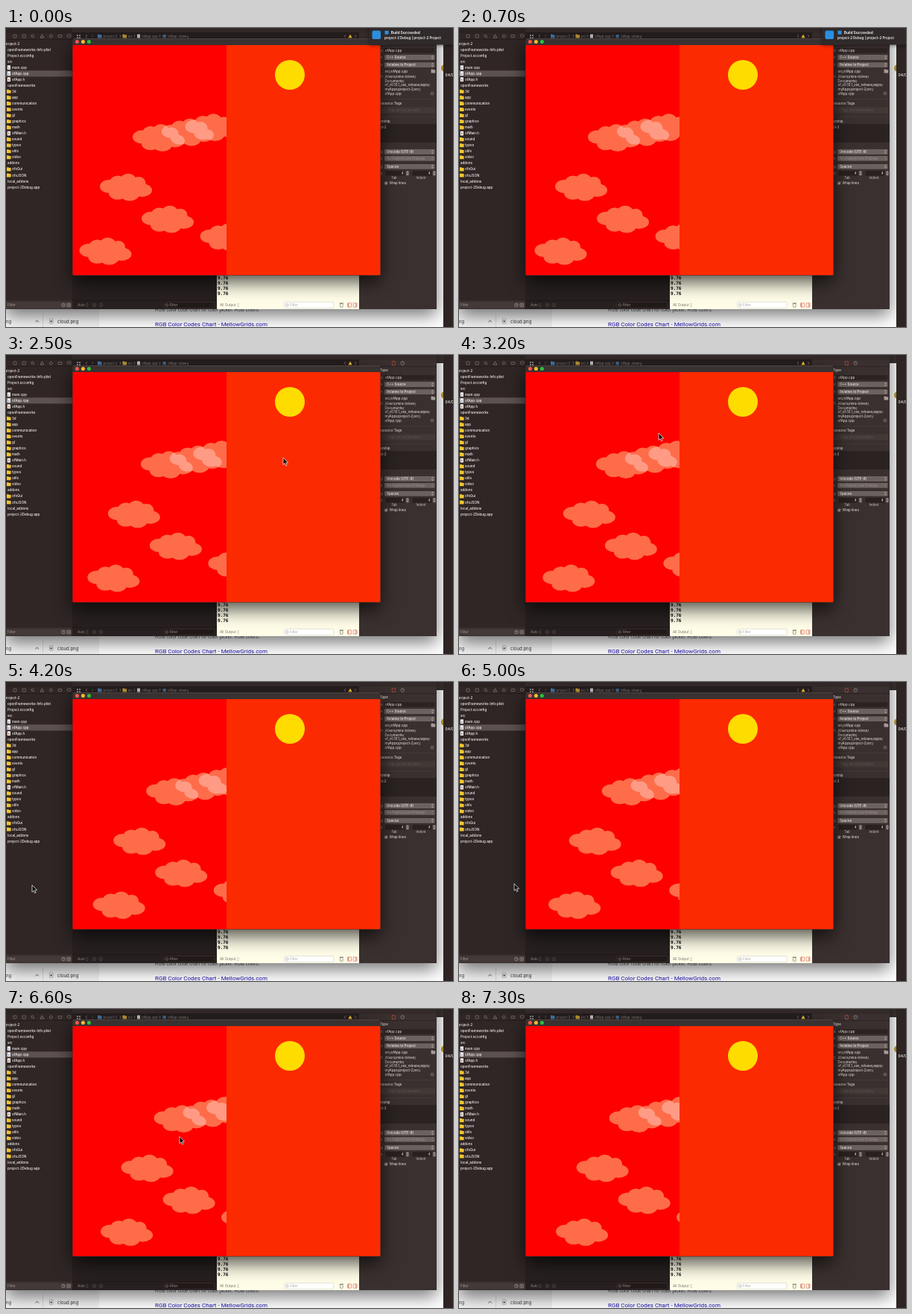
An HTML page with a canvas for the animation above (7400 ms loop, 600x402 px).

```html
<!DOCTYPE html>
<html lang="en">
<head>
<meta charset="utf-8">
<title>Drifting clouds</title>
<style>
html, body { margin: 0; width: 100%; height: 100%; overflow: hidden; background: #2d2423; }
canvas { display: block; width: 600px; height: 402px; }
</style>
</head>
<body>
<canvas id="stage"></canvas>
<script>
const W = 600, H = 402, LOOP = 7400, STEP = 100;
const UI = 'Inter, "Liberation Sans", sans-serif';
const ARIAL = '"Liberation Sans", sans-serif';
const ROBOTO = 'Roboto, sans-serif';
const MONO = '"DejaVu Sans Mono", monospace';
const stage = document.getElementById('stage');
const dpr = window.devicePixelRatio || 1;
stage.width = W * dpr;
stage.height = H * dpr;
let c = stage.getContext('2d');

function rect(x, y, w, h, fill) {
  c.fillStyle = fill;
  c.fillRect(x, y, w, h);
}

function round(x, y, w, h, r, fill, line) {
  c.beginPath();
  c.roundRect(x, y, w, h, r);
  if (fill) { c.fillStyle = fill; c.fill(); }
  if (line) { c.strokeStyle = line; c.lineWidth = 0.6; c.stroke(); }
}

function dot(x, y, r, fill, line) {
  c.beginPath();
  c.arc(x, y, r, 0, Math.PI * 2);
  if (fill) { c.fillStyle = fill; c.fill(); }
  if (line) { c.strokeStyle = line; c.lineWidth = 0.6; c.stroke(); }
}

function lines(points, color, width = 0.7) {
  c.beginPath();
  points.forEach(([x, y], i) => i ? c.lineTo(x, y) : c.moveTo(x, y));
  c.strokeStyle = color;
  c.lineWidth = width;
  c.stroke();
}

// y is the vertical middle of the text
function text(s, x, y, size, color, { font = UI, weight = 400, align = 'left' } = {}) {
  c.font = `${weight} ${size}px ${font}`;
  c.textAlign = align;
  c.textBaseline = 'alphabetic';
  c.fillStyle = color;
  c.fillText(s, x, y + size * 0.36);
}

function chevron(x, y, dir, color) {
  lines([[x - dir, y - 2], [x + dir, y], [x - dir, y + 2]], color);
}

function updown(x, y, color) {
  lines([[x - 1, y - 0.8], [x, y - 2], [x + 1, y - 0.8]], color, 0.6);
  lines([[x - 1, y + 0.8], [x, y + 2], [x + 1, y + 0.8]], color, 0.6);
}

function shadow(blur, dy, alpha, draw) {
  c.save();
  c.shadowColor = `rgba(0,0,0,${alpha})`;
  c.shadowBlur = blur * dpr;
  c.shadowOffsetY = dy * dpr;
  draw();
  c.restore();
}

function browser() {
  rect(0, 0, W, H, '#2d2423');
  rect(0, 376, 125, 26, '#f3f2f3');
  rect(125, 0, 462, H, '#ffffff');
  rect(578, 0, 9, 11, '#3a3231');
  dot(589, 54, 5, '#c39a25');
  text('RGB color code chart for color picker. RGB colors.', 200, 378.5, 6.3, '#56585c', { font: ARIAL });
  text('RGB Color Codes Chart - MellowGrids.com', 200, 398.5, 8, '#1a0dab', { font: ROBOTO });
  text('ng', 0, 394.5, 6, '#3c3c3f');
  lines([[39.5, 395.5], [41.7, 393], [43.9, 395.5]], '#55555a', 0.9);
  rect(49, 384, 0.7, 18, '#cccccc');
  round(58.5, 391, 4.4, 6.4, 0.5, '#ffffff', '#88888c');
  rect(59.5, 393.2, 2.4, 2.4, '#5f6a7d');
  text('cloud.png', 69, 394.7, 6, '#303034');
}

const TREE = [
  ['project-2', 0], ['openFrameworks-Info.plist', 0], ['Project.xcconfig', 0], ['src', 0],
  ['main.cpp', 1], ['ofApp.cpp', 1], ['ofApp.h', 1], ['openFrameworks', 0],
  ['3d', 1], ['app', 1], ['communication', 1], ['events', 1], ['gl', 1], ['graphics', 1],
  ['math', 1], ['ofMain.h', 1], ['sound', 1], ['types', 1], ['utils', 1], ['video', 1],
  ['addons', 0], ['ofxGui', 1], ['ofxJSON', 1], ['local_addons', 0], ['project-2Debug.app', 0]
];

function folder(x, y, fill) {
  round(x, y - 2.5, 2.8, 2, 0.5, fill);
  round(x, y - 1.8, 5.6, 4.4, 0.5, fill);
}

function sidebar() {
  rect(0, 0, 89, 378, '#2f2625');
  rect(0, 0, 89, 7, '#2b2322');
  const icon = '#8e8583';
  round(10, 9, 4, 4, 0.4, null, icon);
  round(22, 9, 4.4, 4, 0.4, null, icon);
  dot(35.5, 10.6, 1.7, null, icon);
  lines([[36.7, 11.8], [38, 13.2]], icon);
  lines([[46, 13], [48.4, 8.8], [50.8, 13], [46, 13]], icon);
  lines([[58, 11], [60.3, 8.7], [62.6, 11], [60.3, 13.3], [58, 11]], icon);
  round(70, 9.5, 4.8, 3, 0.3, null, icon);
  round(82.5, 8.8, 4.4, 3.3, 0.8, null, icon);
  rect(0, 15.2, 89, 0.6, '#1e1817');
  rect(0, 57.2, 89, 8.2, '#5c5250');
  TREE.forEach(([name, level], i) => {
    const y = 20.9 + i * 8.045;
    text(name, level ? 8 : i ? 2 : -1.5, y, 4.5, '#f7f3f2', { weight: 500 });
    if (!level) return;
    if (name.includes('.')) {
      round(1.7, y - 2.9, 4.3, 5.8, 0.4, '#f1eeee');
      text(name.endsWith('.h') ? 'h' : 'c', 2.8, y + 0.4, 3.5, name.endsWith('.h') ? '#a2532d' : '#4668ad', { weight: 700 });
    } else folder(1, y, '#f4c531');
  });
  rect(0, 366.5, 89, 11.5, '#3a302f');
  round(-4, 368.2, 92, 8.5, 2, '#433a38');
  text('Filter', 2, 372.6, 4.6, '#a49a98');
  dot(77, 372.5, 2.3, null, '#b5acaa');
  lines([[77, 371], [77, 372.6], [78.2, 372.6]], '#b5acaa', 0.5);
  round(82, 370.3, 4.4, 4.4, 0.4, null, '#b5acaa');
  lines([[84.2, 371.3], [84.2, 373.7]], '#b5acaa', 0.5);
  lines([[83, 372.5], [85.4, 372.5]], '#b5acaa', 0.5);
}

function editor() {
  rect(89, 0, 385, 378, '#282020');
  rect(89, 0, 385, 6.5, '#332a29');
  rect(89, 6.5, 385, 0.6, '#1b1514');
  const dim = '#8b8280';
  [[95, 9], [98, 9], [95, 12], [98, 12]].forEach(([x, y]) => rect(x, y, 2, 2, dim));
  chevron(108, 11, -1, dim);
  chevron(116, 11, 1, '#5c5351');
  folder(123, 11, '#4779a8');
  text('project-2', 130.5, 11, 4.4, dim);
  chevron(153.5, 11, 0.7, dim);
  folder(156.5, 11, '#c39a32');
  text('src', 163.5, 11, 4.4, dim);
  chevron(172.5, 11, 0.7, dim);
  round(176, 8.4, 4, 5.2, 0.4, '#c9c3c1');
  text('ofApp.cpp', 182, 11, 4.4, dim);
  chevron(206.5, 11, 0.7, dim);
  rect(210.5, 9, 4.3, 4.3, '#40688e');
  text('ofApp::draw()', 217, 11, 4.4, dim);
  chevron(455, 11, -1, dim);
  c.fillStyle = '#f4c72d';
  c.beginPath();
  c.moveTo(459.4, 13.3); c.lineTo(462, 8.4); c.lineTo(464.6, 13.3);
  c.fill();
  chevron(469, 11, 1, dim);
}

function debugArea() {
  rect(89, 332, 194, 46, '#282020');
  rect(283, 332, 191, 46, '#fffde8');
  rect(89, 366, 194, 0.6, '#1b1514');
  for (let i = 0; i < 4; i++) {
    text('9.76', 284, 336.3 + i * 6.8, 6, '#111111', { font: MONO, weight: 700 });
  }
  text('Auto', 96, 372.5, 4.6, '#8d8381');
  updown(109, 372.5, '#8d8381');
  dot(118.5, 372.5, 2.3, null, '#5d5351');
  dot(118.5, 372.5, 0.8, '#5d5351');
  dot(127.3, 372.5, 2.3, null, '#5d5351');
  rect(127, 371.5, 0.6, 2.4, '#5d5351');
  round(212, 368.3, 68, 8.4, 1.8, '#221a19', '#433937');
  dot(215.8, 372.5, 1.7, null, '#9d9391');
  text('Filter', 219.5, 372.6, 4.6, '#9d9391');
  text('All Output', 287, 372.5, 4.6, '#76736a');
  updown(311.5, 372.5, '#76736a');
  round(373.5, 368.3, 66.5, 8.4, 1.8, '#ffffff', '#d2cfc0');
  dot(377.3, 372.5, 1.7, null, '#8c8c8c');
  text('Filter', 381, 372.6, 4.6, '#aaa9a4');
  round(448.5, 370.5, 3.6, 4.8, 0.5, null, '#66635d');
  lines([[447.6, 370], [453, 370]], '#66635d', 0.8);
  round(458.5, 369.8, 5, 5.4, 0.4, null, '#d15a4c');
  round(466, 369.8, 5, 5.4, 0.4, null, '#d15a4c');
  rect(459, 370, 1.6, 5, '#e79a8d');
  rect(469, 370, 1.6, 5, '#e79a8d');
}

function popup(label, y, color = '#f6f1ef') {
  round(508, y - 3.4, 67.5, 6.8, 1.2, '#6b615f');
  text(label, 511, y, 4.5, color, { weight: 500 });
  updown(572.5, y, color);
}

function stepper(x, y) {
  rect(x - 24, y - 3.2, 26, 6.4, '#292120');
  text('4', x, y, 4.4, '#f0eae8', { align: 'right' });
  round(x + 3.4, y - 3.3, 4, 6.6, 1.2, '#6b615f');
  updown(x + 5.4, y, '#f0eae8');
}

function inspector() {
  rect(474, 0, 104, 378, '#3a302f');
  rect(474, 0, 104, 6.5, '#332a29');
  rect(474, 15.2, 104, 0.6, '#241d1c');
  const pale = '#f3eeec', dim = '#9d9391', bold = { weight: 600 };
  round(518.3, 8.4, 4, 5.2, 0.4, null, '#df5140');
  dot(532.3, 11, 2.4, null, dim);
  text('?', 531.3, 11.1, 3.5, dim);
  text('Type', 502, 20.5, 4.5, '#d8d0ce', bold);
  text('e', 503, 30.5, 4.4, dim);
  rect(507.5, 27.2, 68, 6.4, '#2b2322');
  text('ofApp.cpp', 509, 30.5, 4.5, pale);
  text('e', 503, 39.5, 4.4, dim);
  popup('C++ Source', 39.5);
  text('n', 503, 49.6, 4.4, dim);
  popup('Relative to Project', 49.6);
  text('src/ofApp.cpp', 508.5, 58, 4.5, pale);
  folder(570.6, 58, '#a69c9a');
  text('h', 503, 65.3, 4.4, dim);
  ['/Users/mira-tolven/', 'Documents/', 'of_v0.10.1_osx_release/apps/', 'myApps/project-2/src/', 'ofApp.cpp']
    .forEach((s, i) => text(s, 508.5, 65.3 + i * 5.7, 4.5, pale));
  dot(572, 88, 1.9, null, dim);
  lines([[571.2, 88], [572.8, 88]], dim, 0.6);
  rect(502, 95, 74, 0.6, '#4a403e');
  text('esource Tags', 502, 101, 4.5, '#c9c1bf', bold);
  rect(502, 106.5, 74, 8, '#423836');
  text('Tags are not available', 513, 110.5, 4.2, '#5d5351');
  rect(502, 119.5, 74, 0.6, '#4a403e');
  text('ership', 502, 125.2, 4.5, '#c9c1bf', bold);
  rect(502, 129, 76, 25, '#2b2322');
  text('ct-2', 502, 133, 4.4, pale);
  text('g', 503, 166.5, 4.4, dim);
  popup('Unicode (UTF-8)', 166.5);
  text('s', 503, 175.3, 4.4, dim);
  popup('No Explicit Line Endings', 175.3, '#948a88');
  text('g', 503, 186.3, 4.4, dim);
  popup('Spaces', 186.3);
  text('s', 503, 195.3, 4.4, dim);
  stepper(533.5, 195.3);
  stepper(569.5, 195.3);
  text('Tab', 521, 201.3, 4.3, '#cfc7c5', { align: 'center' });
  text('Indent', 557, 201.3, 4.3, '#cfc7c5', { align: 'center' });
  round(508, 206.5, 4.3, 4.3, 0.8, '#7a706e');
  lines([[509, 208.7], [510, 209.8], [511.6, 207.3]], '#ffffff', 0.6);
  text('Wrap lines', 514.5, 208.8, 4.5, pale);
}

function desktop() {
  browser();
  shadow(22, 8, 0.55, () => rect(0, -20, 578, 398, '#2f2625'));
  rect(587, 0, 13, H, '#2d2423');
  text('04/0', 589.5, 63, 5, '#f1ecea', { weight: 500 });
  sidebar();
  editor();
  debugArea();
  inspector();
  c.save();
  c.beginPath();
  c.rect(0, 0, 578, 378);
  c.clip();
  shadow(24, 9, 0.7, () => round(89.5, 14, 413, 318.5, 2, '#3a3231'));
  c.restore();
  round(89.5, 14, 413, 318.4, 2, '#3a3231');
  rect(91, 14, 410, 0.6, '#5b5250');
  ['#f9574e', '#f5bd2f', '#2dc33f'].forEach((fill, i) => dot(95.4 + i * 8, 18.4, 2.5, fill));
  rect(89.5, 23, 206.5, 309.3, '#fe0000');
  rect(296, 23, 206.4, 309.3, '#fc2a00');
  dot(381, 63, 20, '#ffdc00');
}

// lobes as x, y, rx, ry inside a 70 by 38 box
const LOBES = [
  [12, 18, 12, 9], [24, 12.5, 11, 9], [38, 10.5, 11, 9.8], [52, 13.5, 9.5, 8.5],
  [56.5, 23, 13.5, 9], [24, 27, 12, 8.8], [40, 28, 13, 9.5], [36, 20, 20, 11]
];
const CLOUDS = [[126, 195], [182, 238], [98.5, 281], [260.5, 262], [170, 128.5], [209, 121], [240.5, 114.5]];
const SPEED = 4.33 / 1000;

function cloud(x, y) {
  const p = new Path2D();
  for (const [dx, dy, rx, ry] of LOBES) {
    p.moveTo(x + dx + rx, y + dy);
    p.ellipse(x + dx, y + dy, rx, ry, 0, 0, Math.PI * 2);
  }
  return p;
}

function sky(t) {
  const shapes = CLOUDS.map(([x, y]) => cloud(x + t * SPEED, y));
  c.save();
  c.beginPath();
  c.rect(89.5, 23, 206.5, 309);
  c.clip();
  c.fillStyle = '#ff6c4a';
  shapes.forEach(p => c.fill(p));
  c.fillStyle = '#ff9b85';
  for (const i of [4, 5]) {
    c.save();
    c.clip(shapes[i]);
    c.fill(shapes[i + 1]);
    c.restore();
  }
  c.restore();
}

function notice(t) {
  if (t >= 1600) return;
  const k = Math.max(0, (t - 1100) / 500);
  const bold = { weight: 600 };
  c.save();
  c.translate(116 * k * k, 0);
  shadow(5, 1, 0.5, () => round(487.5, -6, 125, 28.5, 3, '#302a2a'));
  round(491.5, 3.5, 11.5, 11.5, 2, '#2b8fe0');
  rect(508.5, 3.6, 5, 5, '#2b8fe0');
  text('Build Succeeded', 516.8, 6.2, 4.8, '#ffffff', bold);
  text('project-2 Debug | project-2 Project', 508, 13.7, 4.5, '#f7f3f2', bold);
  c.restore();
}

// time, x, y of the pointer tip
const TRACK = [
  [1600, 500, 8], [1900, 384, 141], [2500, 372, 138], [3200, 268, 105], [3900, 36, 270],
  [4200, 35, 273], [4700, 74, 271], [5900, 74, 271], [6400, 104, 258], [6900, 470, 12]
];

function pointer(t) {
  const i = TRACK.findIndex(([end]) => t < end);
  if (i < 1) return;
  const [t0, x0, y0] = TRACK[i - 1], [t1, x1, y1] = TRACK[i];
  const u = (t - t0) / (t1 - t0), k = u * u * (3 - 2 * u);
  c.save();
  c.translate(x0 + (x1 - x0) * k, y0 + (y1 - y0) * k);
  c.beginPath();
  [[0, 0], [0, 9.4], [2.1, 7.5], [3.6, 10.8], [5.1, 10.1], [3.7, 6.9], [6.6, 6.7]]
    .forEach(([x, y]) => c.lineTo(x, y));
  c.closePath();
  c.fillStyle = '#0a0a0a';
  c.fill();
  c.strokeStyle = '#ffffff';
  c.lineWidth = 0.7;
  c.stroke();
  c.restore();
}

// the still parts are painted once and reused
const still = document.createElement('canvas');
still.width = stage.width;
still.height = stage.height;
const front = c;
c = still.getContext('2d');
c.scale(dpr, dpr);
desktop();
c = front;
c.scale(dpr, dpr);

const start = performance.now();
function frame() {
  const t = Math.floor(((performance.now() - start) % LOOP) / STEP) * STEP;
  c.drawImage(still, 0, 0, W, H);
  sky(t);
  notice(t);
  pointer(t);
  requestAnimationFrame(frame);
}
frame();
</script>
</body>
</html>
```
